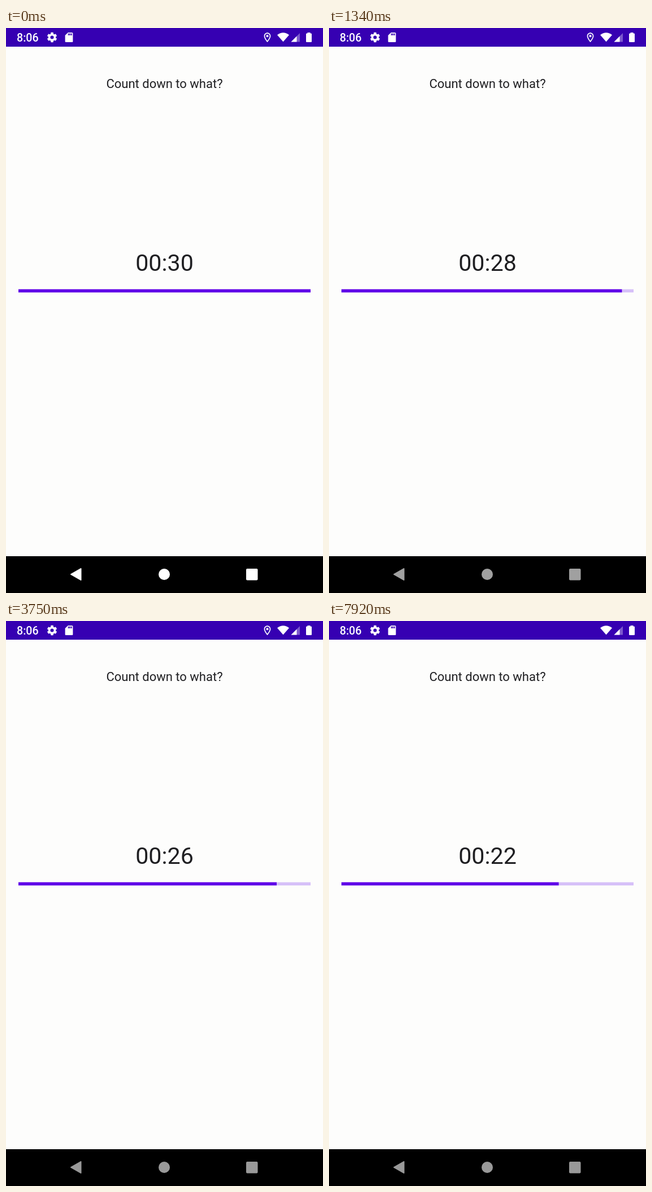
Write an HTML page with a canvas that moves like this. It is 561 px wide and 998 px high and loops after 8 s.

```html
<!DOCTYPE html>
<html lang="en">
<head>
<meta charset="utf-8">
<title>Countdown</title>
<style>
html, body { margin: 0; width: 100%; height: 100%; overflow: hidden; background: #fdfdfc; }
canvas { display: block; width: 561px; height: 998px; }
</style>
</head>
<body>
<canvas id="stage" width="561" height="998"></canvas>
<script>
const ctx = document.getElementById('stage').getContext('2d');
const LOOP = 8000;
const TOTAL = 30;
const BAR = { x: 22, y: 461.5, w: 517, h: 5.6 };
const PIN_HIDDEN_AT = 5950;
const FADE = { start: 90, length: 1500, to: 0.6 };

// [time in ms, seconds counted]
const ELAPSED = [[140, 0], [840, 0.7], [2040, 1.89], [3750, 3.48],
                 [5040, 4.87], [6710, 6.27], [8000, 7.78]];

// Icons on a 24 unit grid
const GEAR = new Path2D('M19.43 12.98c.04-.32.07-.64.07-.98s-.03-.66-.07-.98l2.11-1.65c.19-.15.24-.42.12-.64l-2-3.46c-.12-.22-.39-.3-.61-.22l-2.49 1c-.52-.4-1.08-.73-1.69-.98l-.38-2.65C14.46 2.18 14.25 2 14 2h-4c-.25 0-.46.18-.49.42l-.38 2.65c-.61.25-1.17.59-1.69.98l-2.49-1c-.23-.09-.49 0-.61.22l-2 3.46c-.13.22-.07.49.12.64l2.11 1.65c-.04.32-.07.65-.07.98s.03.66.07.98l-2.11 1.65c-.19.15-.24.42-.12.64l2 3.46c.12.22.39.3.61.22l2.49-1c.52.4 1.08.73 1.69.98l.38 2.65c.03.24.24.42.49.42h4c.25 0 .46-.18.49-.42l.38-2.65c.61-.25 1.17-.59 1.69-.98l2.49 1c.23.09.49 0 .61-.22l2-3.46c.12-.22.07-.49-.12-.64l-2.11-1.65zM12 15.5a3.5 3.5 0 1 1 0-7 3.5 3.5 0 0 1 0 7z');
const CARD = new Path2D('M18 2h-8L4 8v12c0 1.1.9 2 2 2h12c1.1 0 2-.9 2-2V4c0-1.1-.9-2-2-2zM12 8h-2V4h2zm3 0h-2V4h2zm3 0h-2V4h2z');
const PIN = new Path2D('M12 2C8.13 2 5 5.13 5 9c0 5.25 7 13 7 13s7-7.75 7-13c0-3.87-3.13-7-7-7zM7 9a5 5 0 0 1 10 0c0 2.88-2.88 7.19-5 9.88C9.92 16.21 7 11.85 7 9zM14.5 9a2.5 2.5 0 1 0-5 0 2.5 2.5 0 0 0 5 0z');

const WIFI = new Path2D('M480 12.2Q490.5 4.4 501 12.2L490.5 24.3Z');
const SIGNAL = new Path2D('M520 9V24.5H504.5Z');
const SIGNAL_FULL = new Path2D('M514.5 14.5V24.5H504.5Z');
const BACK = new Path2D('M115 965L132.5 955V975Z');

function elapsed(t) {
  if (t <= ELAPSED[0][0]) return 0;
  const i = ELAPSED.findIndex(p => p[0] >= t);
  const [t0, a] = ELAPSED[i - 1], [t1, b] = ELAPSED[i];
  return a + (b - a) * (t - t0) / (t1 - t0);
}

function rect(x, y, w, h, color) {
  ctx.fillStyle = color;
  ctx.fillRect(x, y, w, h);
}

function roundRect(x, y, w, h, r) {
  ctx.beginPath();
  ctx.roundRect(x, y, w, h, r);
  ctx.fill();
}

function text(str, x, y, size, color, align = 'center', weight = 400) {
  ctx.font = `${weight} ${size}px Roboto, sans-serif`;
  ctx.textAlign = align;
  ctx.fillStyle = color;
  ctx.fillText(str, x, y);
}

function icon(path, cx, cy, scale) {
  ctx.save();
  ctx.translate(cx, cy);
  ctx.scale(scale, scale);
  ctx.translate(-12, -12);
  ctx.fill(path, 'evenodd');
  ctx.restore();
}

function statusBar(t) {
  rect(0, 0, 561, 33, '#3600b2');
  text('8:06', 19, 24, 19.6, '#fff', 'left', 500);
  icon(GEAR, 81.5, 16.5, 0.87);
  icon(CARD, 111.5, 16.5, 0.86);
  if (t < PIN_HIDDEN_AT) icon(PIN, 462.5, 16.7, 0.84);
  ctx.fill(WIFI);
  ctx.globalAlpha = 0.35;
  ctx.fill(SIGNAL);
  ctx.globalAlpha = 1;
  ctx.fill(SIGNAL_FULL);
  ctx.fillRect(533.5, 8, 5, 3);
  roundRect(531, 9.5, 10, 15.5, 1.2);
}

function navBar(t) {
  rect(0, 933, 561, 65, '#000');
  const p = Math.min(1, Math.max(0, (t - FADE.start) / FADE.length));
  const eased = (1 - Math.cos(Math.PI * p)) / 2;
  const level = Math.round(255 * (1 - (1 - FADE.to) * eased));
  ctx.fillStyle = ctx.strokeStyle = `rgb(${level},${level},${level})`;
  ctx.lineWidth = 2;
  ctx.lineJoin = 'round';
  ctx.fill(BACK);
  ctx.stroke(BACK);
  ctx.beginPath();
  ctx.arc(280, 965, 10, 0, 2 * Math.PI);
  ctx.fill();
  roundRect(425, 955, 20.5, 20.5, 2);
}

function timer(t) {
  const left = TOTAL - elapsed(t);
  const seconds = String(Math.floor(left)).padStart(2, '0');
  text('Count down to what?', 280.5, 105.5, 22, '#1f1f22');
  text('00:' + seconds, 280.5, 429, 41.2, '#1f1f22');
  rect(BAR.x, BAR.y, BAR.w, BAR.h, '#d6c0f8');
  rect(BAR.x, BAR.y, BAR.w * left / TOTAL, BAR.h, '#6000e8');
}

function draw(now) {
  const t = now % LOOP;
  rect(0, 0, 561, 998, '#fdfdfc');
  timer(t);
  statusBar(t);
  navBar(t);
}

let start;
function tick(now) {
  start ??= now;
  draw(now - start);
  requestAnimationFrame(tick);
}
draw(0);
requestAnimationFrame(tick);
</script>
</body>
</html>
```
